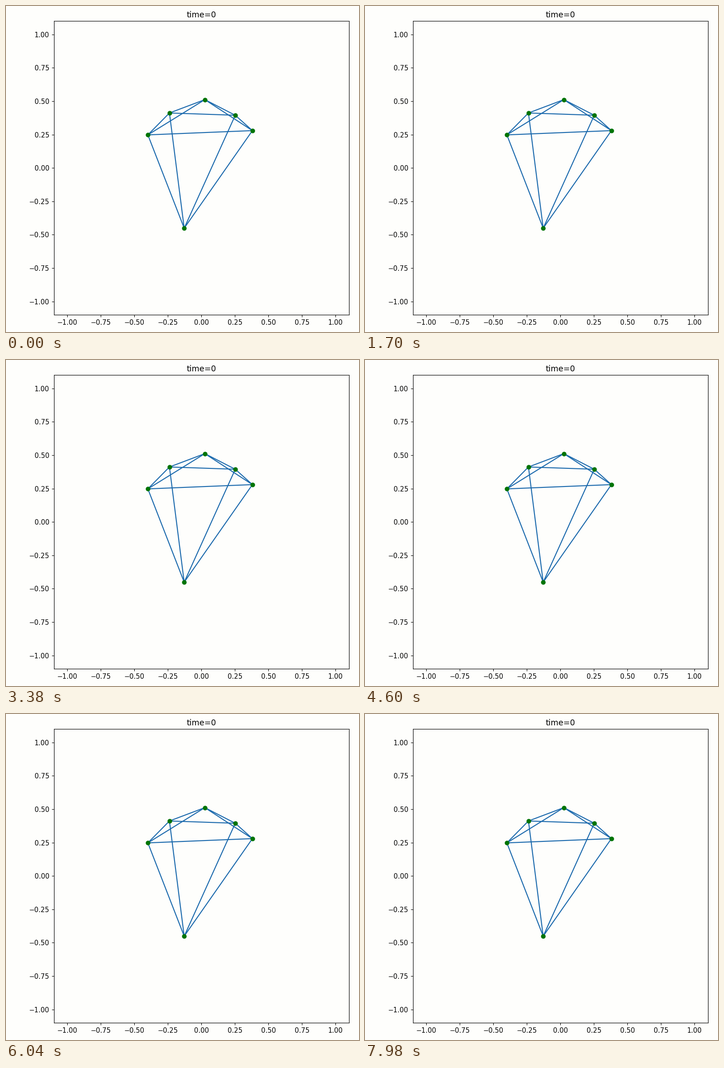
A matplotlib script that plays this animation: 779x719 px, repeating every 8000 ms.

```python
from itertools import combinations

import matplotlib.pyplot as plt
import numpy as np
from matplotlib.animation import FuncAnimation

W, H, DPI = 779, 719, 105
LEFT, RIGHT, TOP, BOTTOM = 105.7, 756.5, 33.4, 681.1
PAPER, BLUE, GREEN = "#fefefc", "#1c6aad", "#007404"

# Octahedron: nodes three places apart are opposite corners.
NODES = np.array([(-0.399, 0.248), (-0.238, 0.412), (0.026, 0.512),
                  (0.253, 0.395), (0.381, 0.28), (-0.128, -0.451)])
EDGES = [(i, j) for i, j in combinations(range(6), 2) if j - i != 3]

plt.rcParams.update({"font.family": "DejaVu Sans", "toolbar": "None"})

# The tiny margin keeps the pixel size from rounding down.
fig = plt.figure(figsize=(W / DPI + 1e-6, H / DPI + 1e-6), dpi=DPI,
                 facecolor=PAPER)
ax = fig.add_axes([LEFT / W, 1 - BOTTOM / H,
                   (RIGHT - LEFT) / W, (BOTTOM - TOP) / H], facecolor=PAPER)
ticks = np.linspace(-1, 1, 9)
ax.set(xlim=(-1.1, 1.1), ylim=(-1.1, 1.1), xticks=ticks, yticks=ticks)
title = ax.set_title("time=0")

bars = [ax.plot([], [], color=BLUE, lw=1.5)[0] for _ in EDGES]
joints, = ax.plot([], [], "o", color=GREEN, ms=6, zorder=3)


def update(_):
    # The structure rests in equilibrium, so its pose is constant.
    for bar, edge in zip(bars, EDGES):
        bar.set_data(*NODES[list(edge)].T)
    joints.set_data(*NODES.T)
    return [*bars, joints, title]


anim = FuncAnimation(fig, update, frames=8, interval=1000, repeat=True,
                     repeat_delay=0, blit=False)
plt.show()
```
